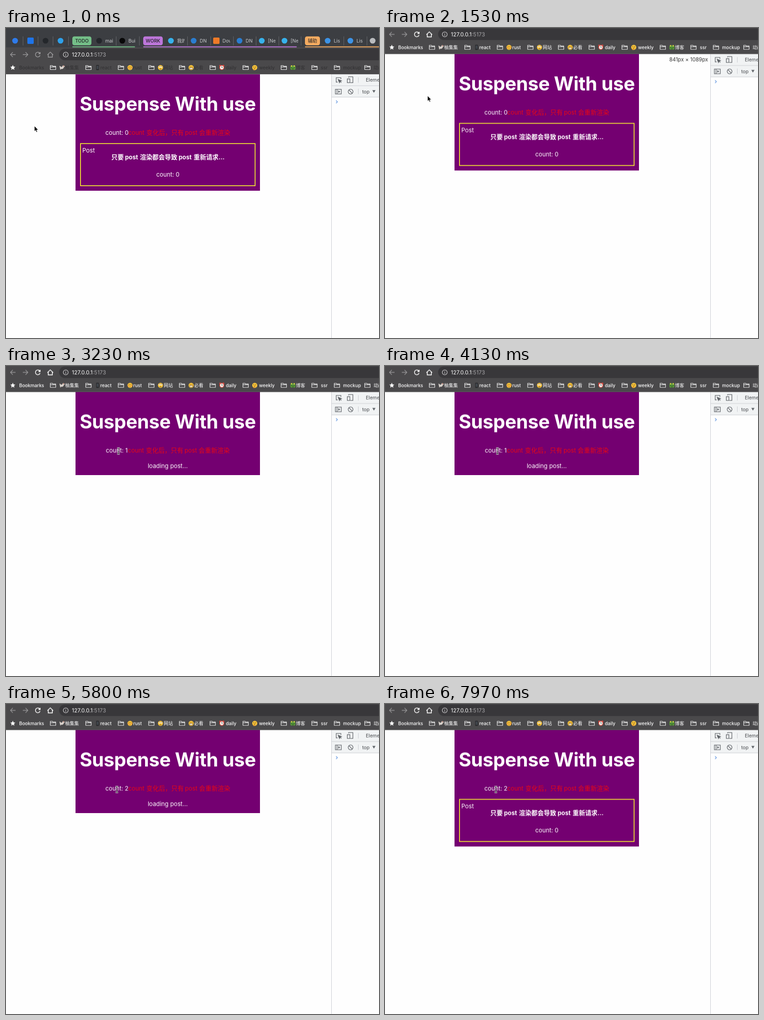
These frames come from a looping animation (821 by 682 pixels, 8 s). An HTML page:

```html
<!DOCTYPE html>
<html lang="zh-CN">
<head>
<meta charset="utf-8">
<title>Suspense With use</title>
<style>
html, body { margin: 0; width: 100%; height: 100%; overflow: hidden; background: #fefefe; }
svg { display: block; }
text { font-family: Inter, "Noto Sans CJK SC", "Noto Sans CJK", sans-serif; white-space: pre; }

.line { fill: none; stroke-width: 1.3; }
.tab { font-size: 10.3px; fill: #c9cbce; }
.chip { font-size: 10.3px; fill: #202124; font-weight: 500; text-anchor: middle; }
.mark { font-size: 10.2px; font-weight: 500; }
.url { font-size: 12px; fill: #fff; }
.tools { font-size: 10.6px; fill: #45484c; }
.body { font-size: 13.2px; fill: #fff; }
.cjk { font-size: 13.7px; }
.bold { font-weight: 700; }

#window, #window .lit, .live, .cursor, .state { animation: 8s infinite; }
#window { animation-name: slide; }
#window .lit { animation-name: lightText; }
.live { animation-name: lightIcon; }
.cursor { animation-name: move; }
.state { animation-timing-function: step-end; }
#size { animation-name: size; }
#post { animation-name: post; }
#loading { animation-name: loading; }
#count0 { animation-name: count0; }
#count1 { animation-name: count1; }
#count2 { animation-name: count2; }
#arrow { animation-name: arrow; }
#beam { animation-name: beam; }

@keyframes slide {
  0%, 3.125% { transform: translateY(44.5px); animation-timing-function: ease-in-out; }
  8.125%, 100% { transform: none; }
}
@keyframes lightText { 0%, 3.125% { fill: #343335; } 8.125%, 100% { fill: #fff; } }
@keyframes lightIcon { 0%, 3.125% { stroke: #99989a; } 8.125%, 100% { stroke: #fff; } }
@keyframes size { 0% { opacity: 0; } 8.125% { opacity: 1; } 20.625%, 100% { opacity: 0; } }
@keyframes post {
  0% { opacity: 1; } 34.875% { opacity: 0; } 59.875% { opacity: 1; }
  71.125% { opacity: 0; } 96.125%, 100% { opacity: 1; }
}
@keyframes loading {
  0% { opacity: 0; } 34.875% { opacity: 1; } 59.875% { opacity: 0; }
  71.125% { opacity: 1; } 96.125%, 100% { opacity: 0; }
}
@keyframes count0 { 0% { opacity: 1; } 34.875%, 100% { opacity: 0; } }
@keyframes count1 { 0% { opacity: 0; } 34.875% { opacity: 1; } 71.125%, 100% { opacity: 0; } }
@keyframes count2 { 0% { opacity: 0; } 71.125%, 100% { opacity: 1; } }
@keyframes arrow { 0% { opacity: 1; } 25.4%, 100% { opacity: 0; } }
@keyframes beam { 0% { opacity: 0; } 25.4%, 100% { opacity: 1; } }
@keyframes move {
  0%, 16% { transform: translate(62px, 215px); animation-timing-function: ease-in; }
  19.125% { transform: translate(93px, 148.5px); }
  20.875% { transform: translate(125px, 151px); animation-timing-function: ease-out; }
  27%, 58.75% { transform: translate(247.5px, 187px); }
  62.5%, 65.6% { transform: translate(247.5px, 185px); }
  68.1%, 100% { transform: translate(244px, 188px); }
}
</style>
</head>
<body>
<svg width="821" height="682" viewBox="0 0 821 682">
  <defs>
    <path id="folder" d="M-6-4.5h4.3l1.5 1.6h6.2v7.4h-12zM-6-1.4h12" fill="none" stroke="#eee" stroke-width="1.2" stroke-linejoin="round"/>
    <g id="ibeam" fill="none"><path d="M-3-6.5Q0-6.5 0-4.5Q0-6.5 3-6.5M0-5V5M-3 6.5Q0 6.5 0 4.5Q0 6.5 3 6.5M-1.6 2h3.2"/></g>
  </defs>
  <g id="window">
    <!-- page -->
    <rect x="153" y="57" width="406" height="183" fill="#740071"/>
    <g id="post" class="state">
      <rect x="153" y="57" width="406" height="256.5" fill="#740071"/>
      <rect x="164" y="209.8" width="384.3" height="92.7" fill="none" stroke="#fbf92c" stroke-width="1.7"/>
      <text class="body" x="168" y="229.7">Post</text>
      <text class="body bold" y="244.3"><tspan class="cjk" x="231.8">只要</tspan><tspan x="262">post</tspan><tspan class="cjk" x="294.7">渲染都会导致</tspan><tspan x="380">post</tspan><tspan class="cjk" x="413">重新请求</tspan><tspan x="468">...</tspan></text>
      <text class="body" x="356.3" y="282.9" text-anchor="middle">count: 0</text>
    </g>
    <text x="356" y="137" text-anchor="middle" font-size="42" font-weight="700" letter-spacing="-.4" fill="#fff">Suspense With use</text>
    <g id="counts"></g>
    <text id="loading" class="body state" x="356" y="224.4" text-anchor="middle">loading post...</text>
    <text id="size" class="state" x="711" y="73" text-anchor="end" font-size="11.5" fill="#333">841px × 1089px</text>

    <!-- developer tools -->
    <rect x="716" y="57" width="105" height="51" fill="#f1f3f4"/>
    <path d="M716.5 57V682M716 82.5H821M716 107.5H821M775.5 64v12M775.5 89v12" class="line" stroke="#c9ccd1" style="stroke-width:1"/>
    <g class="line" stroke="#5f6368">
      <path d="M730 74.5h-3.2V64.8h10.4V68"/>
      <path d="M731 68.7l7.5 3-3.2 1.2-1.4 3.2zM735 72.5l3.2 3.3" fill="#5f6368"/>
      <path d="M754 64.5v-1.7h9.5v13H758M751.3 67.5h5.6v8.4h-5.6z"/>
      <path d="M725 90.3h13v10.4h-13zM728.6 90.3v10.4"/>
      <path d="M731.3 92.7v5.6l4.4-2.8z" fill="#5f6368" stroke="none"/>
      <circle cx="758.5" cy="95.5" r="5.3"/><path d="M754.8 91.8l7.4 7.4"/>
      <path d="M726.5 115l3 3-3 3" stroke="#5b93df"/>
    </g>
    <text class="tools" x="792" y="73.7">Elements</text>
    <text class="tools" x="784" y="99.2">top</text>
    <path d="M806.3 92.3h7l-3.5 5.6z" fill="#5f6368"/>

    <!-- browser frame -->
    <rect y="-46" width="821" height="46" fill="#3c3e42"/>
    <rect y="-2" width="821" height="59" fill="#4a494b"/>
    <path d="M0 56.5H821" stroke="#424143"/>
    <rect x="117" y="1" width="730" height="25.5" rx="12.7" fill="#38373a"/>
    <g class="line" stroke="#99989a">
      <path d="M21 14H10M15 8.8L9.8 14l5.2 5.2M37 14h11M43 8.8l5.2 5.2-5.2 5.2"/>
      <path class="live" d="M74.6 11.5A5.2 5.2 0 1 0 75 15.5M75.2 8.4v3.7h-3.7" style="stroke-width:1.6"/>
      <path class="live" d="M91.2 14.6l6.3-6.1 6.3 6.1M93 13.2v6.4h9v-6.4" style="stroke-width:1.6"/>
      <circle cx="131.5" cy="14" r="5.4" stroke="#c5c4c6"/>
      <path d="M131.5 13.3v3.6M131.5 10.8v1.3" stroke="#c5c4c6"/>
    </g>
    <text class="url" x="145" y="18.2">127.0.0.1<tspan fill="#a9a8ab">:5173</tspan></text>
    <path d="M15 36.8l1.6 3.7 4 .4-3 2.7.9 4-3.5-2.1-3.5 2.1.9-4-3-2.7 4-.4z" fill="#fff"/>
    <g id="marks"></g>
    <g id="tabs"></g>
  </g>
  <g class="cursor">
    <path id="arrow" class="state" d="M.5.5v12l2.7-2.5 1.9 4.3 2-.9-1.8-4.1h3.6z" fill="#000" stroke="#fff" stroke-width=".8"/>
    <g id="beam" class="state">
      <use href="#ibeam" stroke="#fff" stroke-width="3"/>
      <use href="#ibeam" stroke="#1a001a" stroke-width="1.1"/>
    </g>
  </g>
</svg>
<script>
const fillGroup = (id, items, draw) =>
  document.getElementById(id).innerHTML = items.map(draw).join('');
const circle = (x, y, r, fill) => `<circle cx="${x}" cy="${y}" r="${r}" fill="${fill}"/>`;
const rect = (x, y, w, h, rx, fill) =>
  `<rect x="${x}" y="${y}" width="${w}" height="${h}" rx="${rx}" fill="${fill}"/>`;
const path = (d, stroke, width = 1) =>
  `<path d="${d}" fill="none" stroke="${stroke}" stroke-width="${width}"/>`;

// Counter line: the narrower digit pulls both ends inwards.
fillGroup('counts', [0, 1, 2], n => {
  const inset = n === 1 ? 1 : 0;
  return `<text id="count${n}" class="body state" y="190.2"><tspan x="${218.7 + inset}">count: ${n}</tspan>` +
    [[269.3, 'count'], [309, '变化后，只有'], [394, 'post'], [425, '会重新渲染']].map(([x, s]) =>
      `<tspan x="${x - inset}" fill="#ea0714"${s < 'z' ? '' : ' class="cjk"'}>${s}</tspan>`).join('') + '</text>';
});

const face = (extra = '') => circle(0, 0, 5.6, '#fbc73c') +
  circle(-2, -1.3, .9, '#5b3a12') + circle(2, -1.3, .9, '#5b3a12') + extra;
const emoji = {
  bird: '<path d="M-6-4l5 3 3-4 3 1 1 2-2 1q-1 5-6 4l-2 2z" fill="#d9d2cc"/>' + circle(3.2, -3.5, 1, '#b5523c'),
  phone: rect(-3, -5.5, 6, 11, 1, '#242426') + rect(-2, -4, 4, 7.5, 0, '#41464d'),
  blush: face(circle(-3.4, 1.2, 1.3, '#ee8a4a') + circle(3.4, 1.2, 1.3, '#ee8a4a') + path('M-1 3h2', '#5b3a12')),
  eyes: face(circle(-2, -1.5, 1.7, '#fff') + circle(2, -1.5, 1.7, '#fff') + circle(-1.7, -2.2, .8, '#432') +
    circle(2.3, -2.2, .8, '#432') + path('M-2 3h4', '#5b3a12')),
  grin: face('<path d="M-3.5.7h7q-.6 3.3-3.5 3.3t-3.5-3.3z" fill="#fff" stroke="#6b4214" stroke-width=".6"/>'),
  clock: circle(-3.6, -4, 2, '#d8453a') + circle(3.6, -4, 2, '#d8453a') + circle(0, 0, 5.4, '#d8453a') +
    circle(0, 0, 3.9, '#f4f1ec') + path('M0-2.8V0h2', '#333', .9),
  think: face(path('M-1.5 2.2l3-.6', '#5b3a12') + '<path d="M-4 2l2 1.7 3-.2-1 2.2h-3z" fill="#e8962e"/>'),
  dragon: rect(-5.5, -4.5, 11, 9.5, 3, '#5c9a3c') + circle(-3, -3.5, 1.5, '#e8d24a') +
    circle(3, -3.5, 1.5, '#e8d24a') + path('M-4.5 0l3 1.5h3l3-1.5M-2 4h4', '#2d5a25', 1.2)
};

// folder x, label x, label, emoji
fillGroup('marks', [
  [103.5, 130, '柚集集', 'bird'], [181.5, 207.5, 'react', 'phone'], [253, 280, 'rust', 'blush'],
  [320, 347, '网站', 'eyes'], [387.5, 414, '必看', 'grin'], [455, 484, 'daily', 'clock'],
  [527.5, 557, 'weekly', 'think'], [611.5, 638, '博客', 'dragon'], [679, 693, 'ssr'],
  [728.5, 742, 'mockup'], [795.5, 809, '动画']
], ([x, labelX, label, icon]) =>
  `<use href="#folder" x="${x}" y="42.5"/>` +
  (icon ? `<g transform="translate(${x + 20} 42.5)">${emoji[icon]}</g>` : '') +
  `<text class="mark lit" x="${labelX}" y="46.2">${label}</text>`);
document.getElementById('marks').insertAdjacentHTML('beforeend',
  '<text class="mark lit" x="29" y="46.2">Bookmarks</text>');

// icon x, colour, title, square
const tabs = [
  [20, '#2f7bea'], [54, '#1f74e8', '', true], [87, '#24272b'], [120, '#2ea0ea'],
  [205, '#24272b', 'mai'], [256, '#080808', 'Bui'], [363, '#37b2ec', '我的'],
  [413, '#2b7dd0', 'DN '], [463, '#ee7a28', 'Dow', true], [514, '#2b7dd0', 'DN '],
  [563, '#37b2ec', '[Ne'], [613, '#37b2ec', '[Ne'], [708, '#3d93e6', 'Lis'],
  [758, '#3d93e6', 'Lis'], [807, '#b9bbbe']
];
// chip x, chip width, underline end, colour, label
const chips = [
  [146, 42, 284, '#74bf88', 'TODO'], [302, 43, 640, '#bd76da', 'WORK'], [658, 33, 821, '#f5ab60', '辅助']
];
const gaps = [37, 70, 103, 137, 242, 293, 399, 450, 500, 550, 600, 649, 743, 794];
fillGroup('tabs', [
  ...gaps.map(x => path(`M${x}.5-26v20`, '#65676b')),
  ...tabs.map(([x, color, title = '', square]) =>
    (square ? rect(x - 7, -23.5, 14, 14, 2, color) : circle(x, -16.5, 6.3, color)) +
    `<svg x="${x + 13.5}" y="-28" width="16.5" height="22"><text class="tab" y="15.3">${title}</text></svg>`),
  ...chips.map(([x, w, end, color, label]) =>
    rect(x, -26, w, 19.5, 4.5, color) + rect(x, -4, end - x, 2, 1, color) +
    `<text class="chip" x="${x + w / 2}" y="-12.7">${label}</text>`)
], item => item);
</script>
</body>
</html>
```
